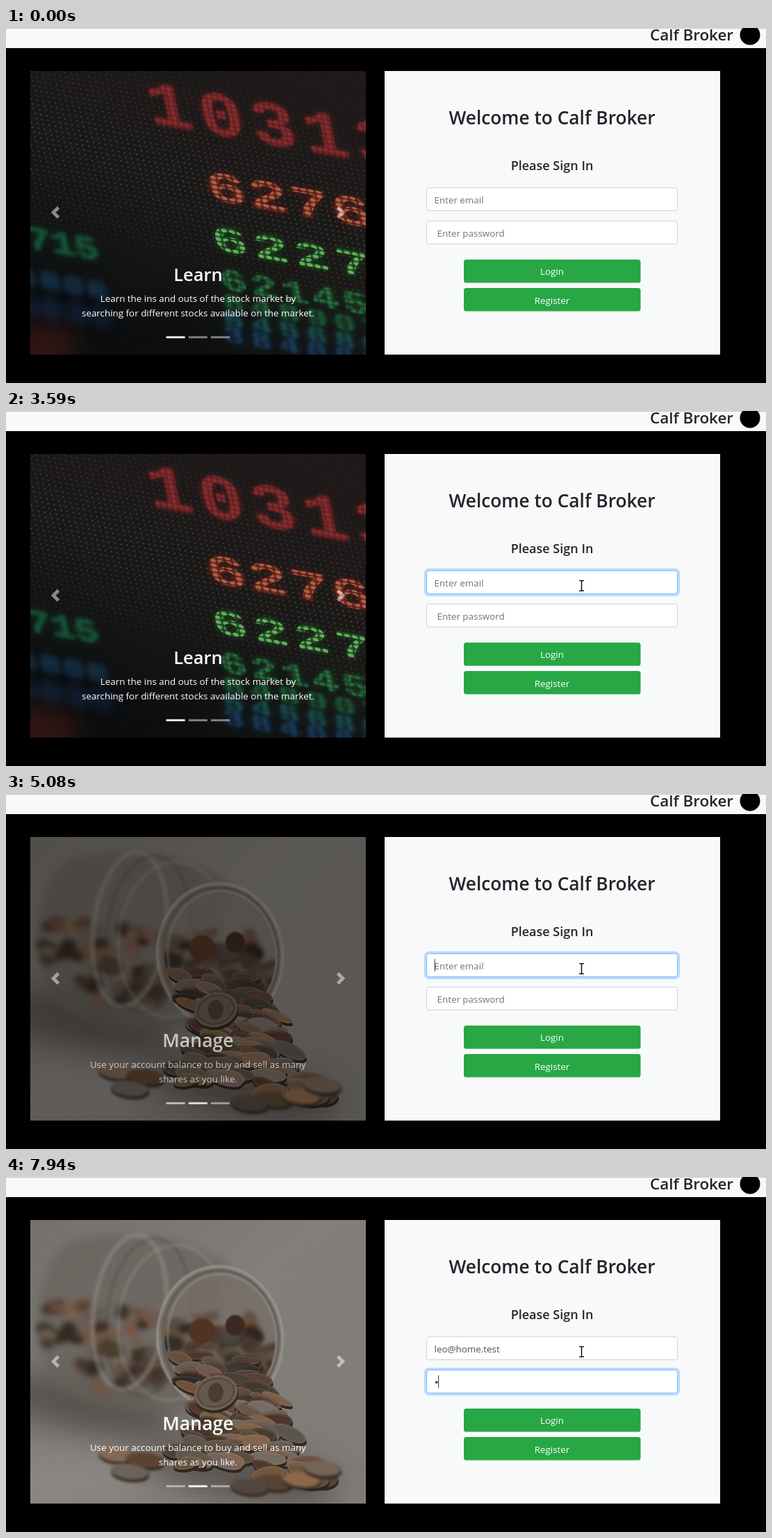
Write an HTML page with a canvas that moves like this. It is 1094 by 512 pixels and loops after 8 s.

```html
<!DOCTYPE html>
<html lang="en">
<head>
<meta charset="utf-8">
<title>Sign in</title>
<style>
  html, body { margin: 0; width: 100%; height: 100%; overflow: hidden; background: #000; }
  canvas { position: absolute; left: 35px; top: 62px; }
  svg { position: absolute; left: 0; top: 0; }
  text { font-family: "Open Sans", "Noto Sans", sans-serif; font-size: 13.4px; }
  .heading { font-weight: 600; fill: #212529; }
  .mid { text-anchor: middle; }
  .white { fill: #fff; }
  .placeholder { fill: #6c757d; }
  .typed { fill: #495057; }
</style>
</head>
<body>
<canvas class="learn" id="board" width="483" height="409"></canvas>
<canvas class="manage" id="jar" width="483" height="409"></canvas>

<svg width="1094" height="512" viewBox="0 0 1094 512">
  <rect width="1094" height="29" fill="#f8f9fa"/>
  <rect width="1094" height="1" fill="#c4c7c9"/>
  <text class="heading" x="1047" y="18" text-anchor="end" style="font-size:22.4px">Calf Broker</text>
  <circle cx="1071" cy="10" r="14.5"/>

  <g class="learn mid white">
    <text class="heading white" x="276.5" y="365" style="font-size:25.6px">Learn</text>
    <text x="276.5" y="394.5">Learn the ins and outs of the stock market by</text>
    <text x="276.5" y="416">searching for different stocks available on the market.</text>
  </g>
  <g class="manage mid white">
    <text class="heading white" x="276.5" y="365" style="font-size:26.6px">Manage</text>
    <text x="276.5" y="394.5">Use your account balance to buy and sell as many</text>
    <text x="276.5" y="416">shares as you like.</text>
  </g>
  <g class="white">
    <path opacity=".5" transform="translate(62 257) scale(2.25)" d="M5.25 0l-4 4 4 4 1.5-1.5-2.5-2.5 2.5-2.5z"/>
    <path opacity=".5" transform="translate(473 257) scale(2.25)" d="M2.75 0l-1.5 1.5 2.5 2.5-2.5 2.5 1.5 1.5 4-4z"/>
    <rect id="tab1" x="230.6" y="444.6" width="27" height="2.8"/>
    <rect id="tab2" x="262.8" y="444.6" width="27" height="2.8"/>
    <rect x="295" y="444.6" width="27" height="2.8" opacity=".5"/>
  </g>

  <rect x="545" y="62" width="483" height="409" fill="#f8f9fa"/>
  <text class="heading mid" x="786" y="138.5" style="font-size:26.3px">Welcome to Calf Broker</text>
  <text class="heading mid" x="786" y="205" style="font-size:18px">Please Sign In</text>

  <g id="emailBox"></g>
  <g id="passwordBox"></g>
  <text class="placeholder" id="emailHint" x="616.5" y="252.5">Enter email</text>
  <text class="typed" id="email" x="616.5" y="252.5"></text>
  <text class="placeholder" id="passwordHint" x="620.5" y="301">Enter password</text>
  <circle class="typed" id="bullet" cx="619.6" cy="296" r="2"/>
  <rect class="typed" id="caret" width="1.2" height="18"/>

  <rect x="659" y="334" width="254.5" height="33.5" rx="3.6" fill="#28a745"/>
  <rect x="659" y="375" width="254.5" height="33.5" rx="3.6" fill="#28a745"/>
  <text class="mid white" x="786" y="356">Login</text>
  <text class="mid white" x="786" y="397.5">Register</text>

  <g id="cursor">
    <path id="arrow" d="M0 0V15.5L3.6 12.2 6 17.6 8.4 16.5 6.1 11.3H11Z" fill="#fff" stroke="#000" stroke-width=".9"/>
    <path id="beam" d="M-3.5 -7.4H-1L0 -6.6 1 -7.4H3.5M-3.5 7.4H-1L0 6.6 1 7.4H3.5M0 -7V7" fill="none" stroke="#000" stroke-width="1.4"/>
  </g>
</svg>

<script>
const LOOP = 8000;
const ADDRESS = 'leo@home.test';
const KEY_TIMES = [5200, 5330, 5530, 5990, 6280, 6390, 6500, 6610, 6750, 6940, 7080, 7180, 7280];
const el = id => document.getElementById(id);
const set = (node, attrs) => { for (const k in attrs) node.setAttribute(k, attrs[k]); };
const show = (id, on) => set(el(id), { visibility: on ? 'visible' : 'hidden' });
const ramp = (t, from, to) => Math.min(1, Math.max(0, (t - from) / (to - from)));
const smooth = p => p * p * (3 - 2 * p);
const mix = (a, b, p) => a + (b - a) * p;

// CSS "ease": cubic-bezier(.25, .1, .25, 1)
function ease(x) {
  let lo = 0, hi = 1, s = x;
  for (let i = 0; i < 18; i++) {
    s = (lo + hi) / 2;
    const bx = .75 * s * (1 - s) ** 2 + .75 * s * s * (1 - s) + s ** 3;
    if (bx < x) lo = s; else hi = s;
  }
  return .3 * s * (1 - s) ** 2 + 3 * s * s * (1 - s) + s ** 3;
}

function randomFrom(seed) {
  return () => (seed = seed * 16807 % 2147483647) / 2147483647;
}

// Both pictures are drawn in stage coordinates.
function stageContext(id) {
  const c = el(id).getContext('2d');
  c.translate(-35, -62);
  return c;
}

function gradient(c, x0, y0, x1, y1, ...colors) {
  const g = c.createLinearGradient(x0, y0, x1, y1);
  colors.forEach((color, i) => g.addColorStop(i / (colors.length - 1), color));
  return g;
}

function ellipse(c, x, y, rx, ry, tilt, fill) {
  c.beginPath();
  c.ellipse(x, y, rx, ry, tilt, 0, 7);
  c.fillStyle = fill;
  c.fill();
}

function paintBoard() {
  const c = stageContext('board');
  c.fillStyle = gradient(c, 380, 62, 180, 471, '#1f1919', '#1a1918', '#0c0e0f');
  c.fillRect(35, 62, 483, 409);

  for (let row = -14; row < 60; row++) {
    for (let col = -14; col < 62; col++) {
      const x = 35 + col * 8.6 + row * 1.7, y = 62 + row * 7 + col * 1.5;
      const light = Math.max(.05, .42 - Math.abs(y - 130 - x * .33) / 480);
      const fade = y > 270 + x * .25 ? .25 : 1;
      ellipse(c, x, y, 1.15, 1, 0, `rgba(150,146,130,${light * fade})`);
    }
  }

  const bulbs = (color) => {
    const tile = document.createElement('canvas');
    tile.width = tile.height = 7;
    ellipse(tile.getContext('2d'), 3.5, 3.5, 2.7, 2.7, 0, color);
    return c.createPattern(tile, 'repeat');
  };
  function digits(text, x, y, size, step, stretch, glow, lamp, blur) {
    c.textAlign = 'center';
    c.textBaseline = 'middle';
    c.font = `bold ${size}px "Liberation Mono", monospace`;
    [...text].forEach((digit, i) => {
      c.save();
      c.translate(x + i * step, y + i * step * .18);
      c.transform(stretch, .18 * stretch, .2, 1, 0, 0);
      const layers = [[glow, blur + 4, .75], [glow, blur + .5, .55], [bulbs(lamp), blur + .3, .9]];
      for (const [fill, radius, alpha] of layers) {
        c.filter = `blur(${radius}px)`;
        c.globalAlpha = alpha;
        c.fillStyle = fill;
        c.fillText(digit, 0, 0);
      }
      c.restore();
    });
  }
  digits('10313', 236, 119, 92, 75, 1.2, '#6b2022', '#933234', .5);
  digits('6276', 318, 236, 62, 60, 1.6, '#74231a', '#b3684c', .2);
  digits('6227', 323, 311, 54, 59, 1.6, '#17571f', '#75b568', .2);
  digits('62145', 328, 368, 44, 44, 1.5, '#14502a', '#35804a', 1);
  digits('648907', 328, 399, 34, 40, 1.7, '#15492a', '#256a42', 1.6);
  digits('545680', 328, 424, 32, 40, 1.7, '#16404a', '#1d5a55', 2);
  digits('384062', 328, 446, 32, 40, 1.7, '#17304f', '#1d4a70', 2.4);
  digits('715', 48, 308, 46, 34, 1.3, '#135038', '#1c7048', 2.2);
  digits('5806', 30, 362, 36, 34, 1.5, '#15324a', '#1a4460', 4);
  digits('8830', 30, 402, 40, 36, 1.5, '#132440', '#172f52', 6);

  c.filter = 'blur(18px)';
  ellipse(c, 45, 460, 60, 34, 0, 'rgba(75,28,24,.6)');
  ellipse(c, 210, 445, 80, 34, 0, 'rgba(12,14,15,.7)');
  c.filter = 'none';
}

function paintJar() {
  const c = stageContext('jar');
  const rnd = randomFrom(71);
  const between = (a, b) => a + (b - a) * rnd();
  const ring = (x, y, rx, ry, tilt, width, color) => {
    c.beginPath();
    c.ellipse(x, y, rx, ry, tilt, 0, 7);
    c.lineWidth = width;
    c.strokeStyle = color;
    c.stroke();
  };
  const metal = (dark = 0) =>
    `hsl(${between(18, 34)} ${between(7, 32)}% ${between(21, 44) - dark}%)`;
  function coin(x, y, rx, ry, tilt, fill) {
    ellipse(c, x + 1, y + 4, rx, ry, tilt, '#30261f');
    ellipse(c, x, y, rx, ry, tilt, fill);
    ring(x, y, rx - 2, ry - 1.5, tilt, 1, 'rgba(190,175,160,.22)');
  }

  c.fillStyle = gradient(c, 35, 62, 420, 471, '#74706c', '#827e7a', '#807c78');
  c.fillRect(35, 62, 483, 409);
  c.filter = 'blur(22px)';
  ellipse(c, 120, 330, 130, 40, .2, 'rgba(62,56,51,.6)');
  ellipse(c, 70, 440, 130, 45, 0, 'rgba(148,144,140,.45)');
  ellipse(c, 340, 425, 140, 40, .2, 'rgba(60,52,46,.55)');

  // Glass body and its blurred contents
  c.filter = 'blur(7px)';
  c.beginPath();
  c.moveTo(92, 94);
  c.bezierCurveTo(32, 130, 28, 275, 88, 312);
  c.bezierCurveTo(150, 345, 230, 340, 300, 335);
  c.lineTo(320, 125);
  c.bezierCurveTo(250, 85, 170, 72, 92, 94);
  c.fillStyle = 'rgba(102,96,90,.65)';
  c.fill();
  c.filter = 'blur(4px)';
  for (let i = 0; i < 60; i++) {
    const x = between(58, 265);
    ellipse(c, x, between(178 + (x - 58) * .15, 305), between(9, 20), between(6, 13), between(-.7, .8), metal(5));
  }
  c.filter = 'blur(2px)';
  ring(178, 195, 52, 112, .12, 7, 'rgba(158,152,146,.4)');
  ring(205, 202, 60, 114, .12, 3, 'rgba(60,54,50,.35)');
  ring(240, 210, 78, 112, .1, 5, 'rgba(160,155,150,.3)');

  // Mouth of the jar
  c.filter = 'blur(1px)';
  ellipse(c, 308, 232, 90, 103, -.1, 'rgba(118,111,104,.8)');
  c.save();
  c.beginPath();
  c.ellipse(308, 232, 80, 95, -.1, 0, 7);
  c.clip();
  c.filter = 'blur(3px)';
  for (let i = 0; i < 38; i++) {
    ellipse(c, between(232, 385), between(195, 290), between(9, 19), between(6, 14), between(-.6, .7), metal(7));
  }
  c.filter = 'blur(1px)';
  ellipse(c, 282, 222, 19, 18, 0, '#523221');
  ellipse(c, 330, 214, 14, 15, 0, '#3b2a21');
  c.restore();
  ring(308, 232, 90, 103, -.1, 4, 'rgba(165,160,156,.65)');
  ring(309, 232, 83, 97, -.1, 2, 'rgba(65,58,53,.55)');
  ring(311, 232, 78, 92, -.1, 3, 'rgba(158,153,148,.45)');

  // Coins spilling out of the mouth and over the table
  c.filter = 'blur(.6px)';
  for (let i = 0; i < 42; i++) {
    const y = 262 + i * 1.6;
    coin(between(245, 372) + i * .7, y + between(-5, 8), between(17, 26), between(6, 11), between(-.2, .5), metal(4));
  }
  for (let i = 0; i < 62; i++) {
    const p = i / 62;
    const x = mix(330, 355, p) + between(-1, 1) * mix(45, 115, p);
    coin(x, mix(325, 428, p) + (x - 340) * .12, between(18, 29), between(7, 13), between(-.2, .5), metal());
  }
  c.filter = 'blur(2px)';
  [[160, 400], [200, 408], [178, 425], [385, 440], [425, 436], [350, 446], [455, 420]].forEach(([x, y]) =>
    coin(x, y, 27, 11, .1, metal()));
  c.filter = 'none';
  coin(302, 311, 32, 25, -.25, '#66584d');
  ring(302, 311, 26, 20, -.25, 1.2, 'rgba(40,30,25,.5)');
  ellipse(c, 302, 311, 11, 14, .1, 'rgba(55,43,36,.6)');
}

function drawField(id, y, focus) {
  const border = [[206, 128], [212, 189], [218, 255]].map(([a, b]) => Math.round(mix(a, b, focus)));
  const spread = 3 * focus;
  el(id).innerHTML =
    `<rect x="${605 - spread}" y="${y - spread}" width="${362 + 2 * spread}" height="${34 + 2 * spread}"
       rx="${3.6 + spread}" fill="rgba(0,123,255,${.25 * focus})"/>
     <rect x="605.5" y="${y + .5}" width="361" height="33" rx="3.6" fill="#fff" stroke="rgb(${border})"/>`;
}

function drawCursor(t) {
  const p = smooth(ramp(t, 1040, 1770));
  const x = t < 670 ? 1036 : mix(1057, 828.5, p);
  const y = t < 670 ? 502 : mix(494.5, 252, p);
  const overField = x < 967 && (y > 230 && y < 264 || y > 278 && y < 312);
  set(el('cursor'), { transform: `translate(${x} ${y})` });
  show('arrow', t >= 610 && !overField);
  show('beam', t >= 610 && overField);
}

function drawCarousel(t) {
  const fade = ease(ramp(t, 4850, 5410));
  document.querySelectorAll('.learn').forEach(n => n.style.opacity = t < 4800 ? 1 : 0);
  document.querySelectorAll('.manage').forEach(n => n.style.opacity = fade);
  set(el('tab1'), { opacity: 1 - fade / 2 });
  set(el('tab2'), { opacity: .5 + fade / 2 });
}

function drawForm(t) {
  const moved = ease(ramp(t, 7520, 7680));
  const inPassword = t >= 7540;
  drawField('emailBox', 230, ease(ramp(t, 2000, 2200)) * (1 - moved));
  drawField('passwordBox', 278, moved);

  const count = KEY_TIMES.filter(k => t >= k).length;
  const hasBullet = t >= 7940;
  el('email').textContent = ADDRESS.slice(0, count);
  show('emailHint', count === 0);
  show('passwordHint', !hasBullet);
  show('bullet', hasBullet);

  const textWidth = count ? el('email').getComputedTextLength() : 0;
  set(el('caret'), {
    x: inPassword ? (hasBullet ? 622 : 616.5) : 616.5 + textWidth,
    y: inPassword ? 286 : 238
  });
  show('caret', t >= 2020 && t < 2610 || t >= 3130 && t < 3590 || t >= 4800);
}

const start = performance.now();
function frame() {
  const t = (performance.now() - start) % LOOP;
  drawCarousel(t);
  drawForm(t);
  drawCursor(t);
  requestAnimationFrame(frame);
}

paintBoard();
paintJar();
frame();
</script>
</body>
</html>
```
